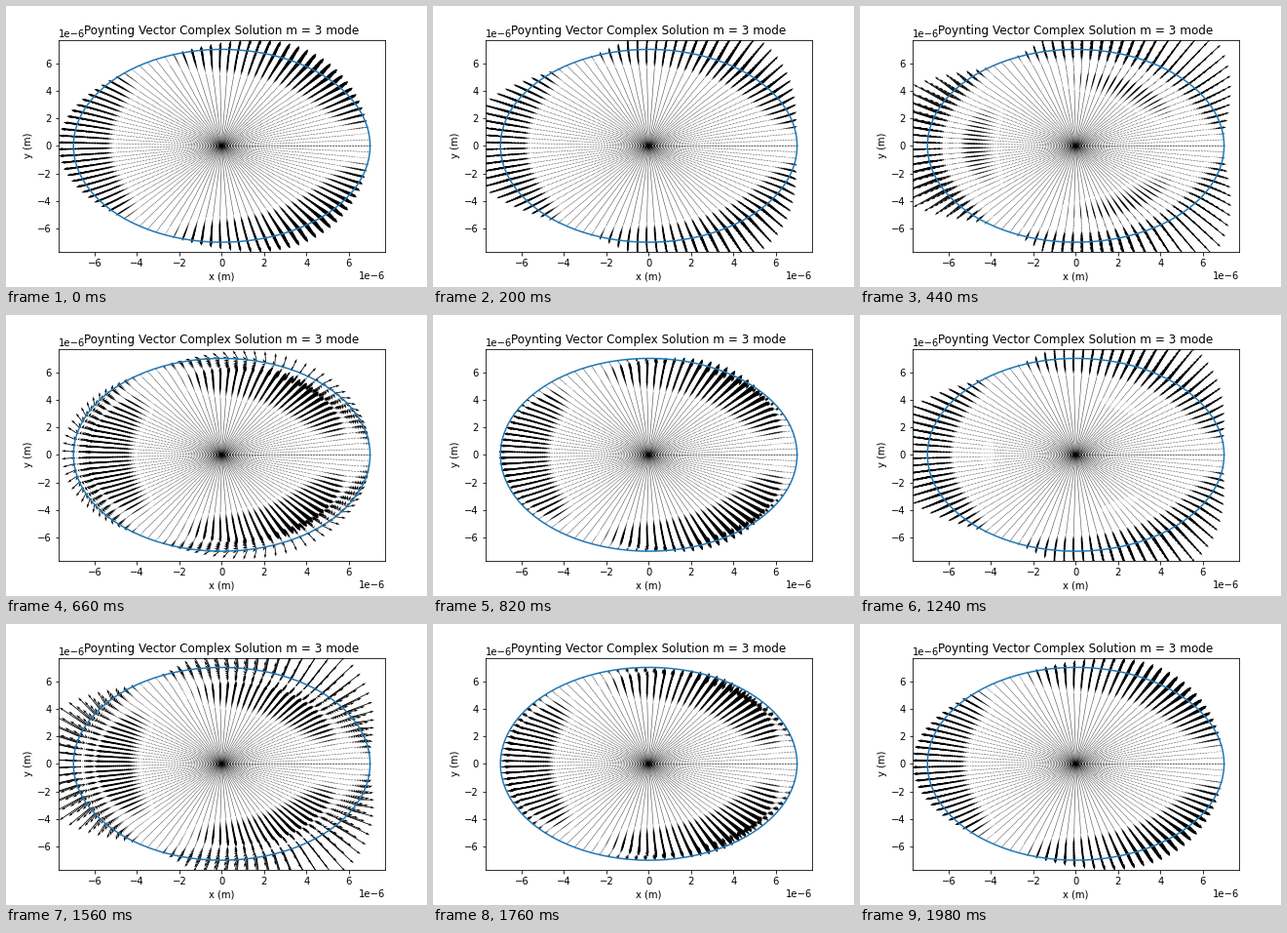
Animation, 432 px wide and 288 px high, one loop 2000 ms. Source, as a matplotlib script:

```python
import numpy as np
import matplotlib.pyplot as plt
from matplotlib.animation import FuncAnimation

FRAMES = 100
N = 100              # samples along radius and angle
RADIUS = 7e-6
ORDER = 3 / 2        # half-integer order of the m = 3 mode
K = 7.1 - 5j         # complex wavenumber times radius

rho, theta = np.meshgrid(np.linspace(1e-8 / RADIUS, 1, N),
                         np.linspace(0, 2 * np.pi, N))
cos, sin = np.cos(theta), np.sin(theta)

# Bessel function of order 3/2 and its derivative
z = K * rho
bessel = np.sqrt(2 / (np.pi * z)) * (np.sin(z) / z - np.cos(z))
slope = np.sqrt(2 / (np.pi * z)) * np.sin(z) - ORDER * bessel / z

# complex amplitudes of the fields
e_z = bessel * np.sin(ORDER * theta)
h_theta = 1j * K * slope * np.sin(ORDER * theta)
h_r = -1j * ORDER / rho * bessel * np.cos(ORDER * theta)


def poynting(frame):
    """Instantaneous Poynting vector, scaled to a mean length of one."""
    turn = np.exp(-2j * np.pi * frame / (FRAMES - 1))
    e = (e_z * turn).real
    s_r = -e * (h_theta * turn).real
    s_theta = e * (h_r * turn).real
    mean = np.hypot(s_r, s_theta).mean()
    return (s_r * cos - s_theta * sin) / mean, (s_r * sin + s_theta * cos) / mean


fig, ax = plt.subplots(figsize=(6, 4), dpi=72)
fig.subplots_adjust(left=0.125, right=0.9, bottom=0.125, top=0.88)

arrows = ax.quiver(RADIUS * rho * cos, RADIUS * rho * sin, *poynting(0),
                   scale=1.8 * N)

ring = np.linspace(0, 2 * np.pi, 200)
ax.plot(RADIUS * np.cos(ring), RADIUS * np.sin(ring), color="tab:blue")

ax.set_xlim(-1.1 * RADIUS, 1.1 * RADIUS)
ax.set_ylim(-1.1 * RADIUS, 1.1 * RADIUS)
ax.set_title("Poynting Vector Complex Solution m = 3 mode", y=1.0)
ax.set_xlabel("x (m)")
ax.set_ylabel("y (m)")


def update(frame):
    arrows.set_UVC(*poynting(frame))
    return (arrows,)


anim = FuncAnimation(fig, update, frames=FRAMES, interval=20,
                     repeat=True, repeat_delay=0)
plt.show()
```
